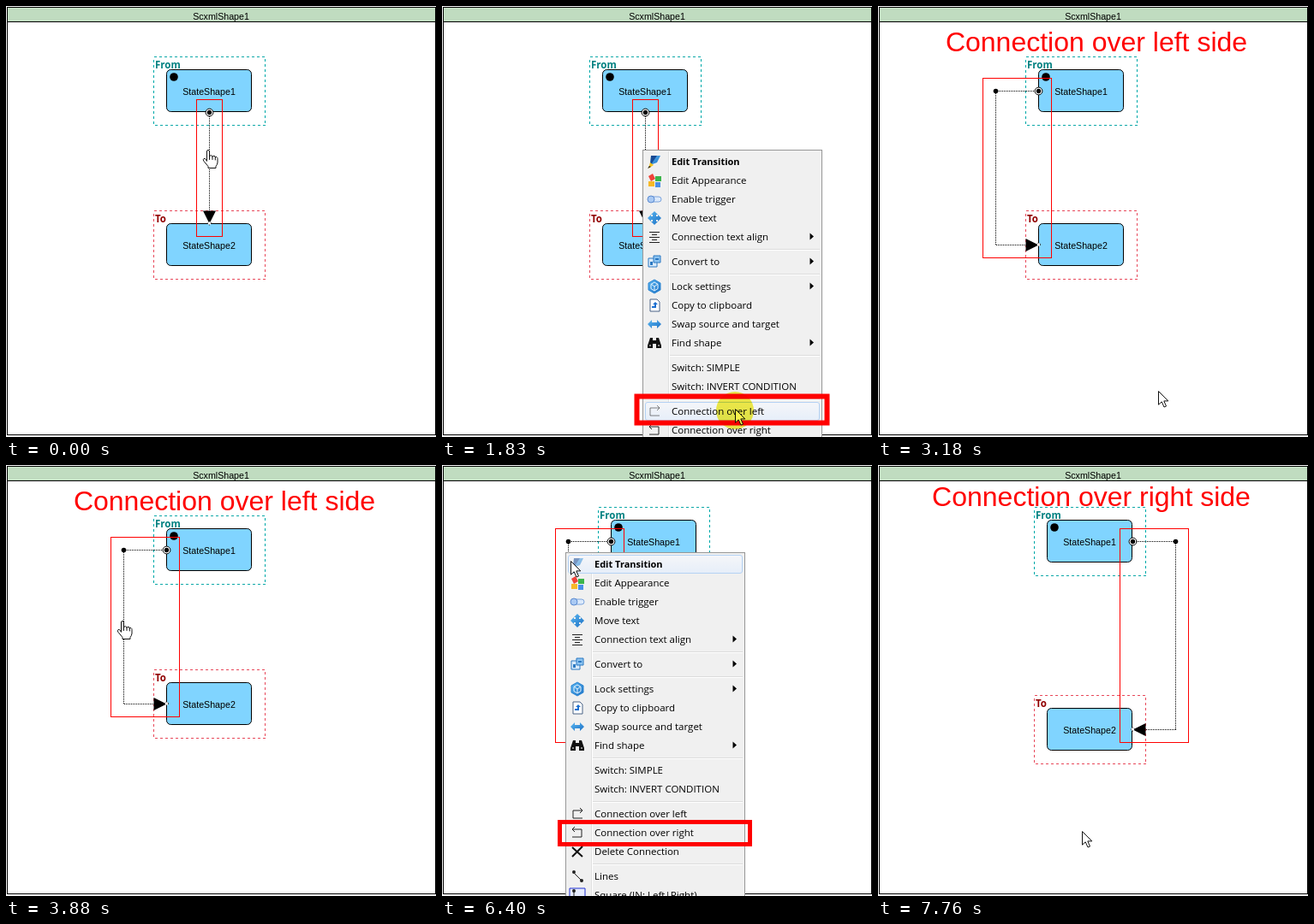
Write an HTML page that moves like this. It is 502 px wide and 504 px high and loops after 8 s.

```html
<!DOCTYPE html>
<html lang="en">
<head>
<meta charset="utf-8">
<title>Connection sides</title>
<style>
html, body { margin: 0; width: 100%; height: 100%; overflow: hidden; background: #fff; }
svg { display: block; width: 502px; height: 504px; }
text { font: 11.5px "Open Sans", "Noto Sans", sans-serif; fill: #000; }
.label { font: 10.67px "Liberation Sans", Arial, sans-serif; text-anchor: middle; }
.tag { font-weight: 700; }
.bold { font-weight: 700; font-size: 11px; }
.title { font: 32px "Liberation Sans", Arial, sans-serif; fill: #f00; text-anchor: middle; }
.crisp { shape-rendering: crispEdges; }
.glow { visibility: hidden; }
.hot > .glow { visibility: visible; }
.hot > .icon { opacity: .55; }
.hot > .more { opacity: .08; }
.solo > :not(.hot) { display: none; }
#click { mix-blend-mode: multiply; }
</style>
</head>
<body>
<svg id="stage" viewBox="0 0 502 504">
  <defs>
    <linearGradient id="hover" x2="0" y2="1">
      <stop offset="0" stop-color="#f5f6f9"/><stop offset="1" stop-color="#e6eef9"/>
    </linearGradient>
    <linearGradient id="blue" x2="1" y2="1">
      <stop offset="0" stop-color="#5cb8f2"/><stop offset="1" stop-color="#1a6fc4"/>
    </linearGradient>
  </defs>
  <g class="crisp" stroke="#000">
    <rect x="1.5" y="1.5" width="500" height="500" fill="#fff"/>
    <rect x="1.5" y="1.5" width="500" height="17" fill="#c0dcc0"/>
  </g>
  <text class="label" x="251" y="16">ScxmlShape1</text>
  <g id="scenes"></g>
  <text class="title" id="leftTitle" x="255" y="53">Connection over left side</text>
  <text class="title" id="rightTitle" x="249" y="48">Connection over right side</text>
  <g id="menus"></g>
  <g fill="none" stroke="#f00">
    <rect id="leftBox" x="227.5" y="456.5" width="222" height="31" stroke-width="6"/>
    <rect id="rightBox" x="137.5" y="417.5" width="222" height="26" stroke-width="5"/>
  </g>
  <path id="arrow" d="M.5 .5V16.2L4.2 12.8 7 19 9.5 18 6.8 11.9H11.8Z" fill="#fff" stroke="#111" stroke-linejoin="round"/>
  <g id="hand" stroke="#111" stroke-linejoin="round" stroke-linecap="round">
    <path fill="#fff" d="M-1.5 13V2Q-1.5 .5 0 .5T1.5 2V8Q2 6.5 3.5 6.7T5 8.5Q5.5 7 7 7.3T8.3 9.2Q9 8 10 8.6T11 10.5V15Q10.5 18 9 19.5V21.5H0V19.5L-5 13.5Q-6.5 11.5-5 10.5T-2.5 11.8Z"/>
    <path fill="none" d="M1.5 8V11.5M5 8.5V11.5M8.3 9.2V12"/>
  </g>
  <circle id="click" r="22" fill="#f6f04a"/>
</svg>
<script>
const $ = id => document.getElementById(id);

function add(parent, tag, attrs = {}, text) {
  const el = document.createElementNS("http://www.w3.org/2000/svg", tag);
  for (const k in attrs) el.setAttribute(k, attrs[k]);
  if (text) el.textContent = text;
  return parent.appendChild(el);
}
const show = (el, on) => el.style.display = on ? "" : "none";
const place = (el, x, y) => el.setAttribute("transform", `translate(${x} ${y})`);

// ---- diagrams ----
function state(g, x, y, name, tag, dash, ink) {
  add(g, "rect", { x: x - 14.5, y: y - 14.5, width: 130, height: 80, fill: "none", stroke: dash, "stroke-dasharray": "3 3", class: "crisp" });
  add(g, "rect", { x: x + .5, y: y + .5, width: 99, height: 49, rx: 5, fill: "#80d4ff", stroke: "#000" });
  add(g, "text", { x: x + 50, y: y + 30, class: "label" }, name);
  add(g, "text", { x: x - 13, y: y - 1, class: "tag", style: `fill:${ink}` }, tag);
}

function scene(x, y, y2, side) {
  const g = add($("scenes"), "g");
  state(g, x, y, "StateShape1", "From", "#00a8a8", "#008080");
  state(g, x, y2, "StateShape2", "To", "#e8485a", "#900000");
  add(g, "circle", { cx: x + 9, cy: y + 9, r: 4.8 });

  const sx = x + 50 + side * 50, via = sx + side * 50;
  const top = side ? y + 25 : y + 50, end = side ? y2 + 25 : y2;
  const line = `M${sx + .5} ${top + .5}H${via + .5}V${end + .5}H${sx + .5}`;
  add(g, "path", { d: line, fill: "none", stroke: "#000", "stroke-dasharray": "1 1", class: "crisp" });
  if (side) add(g, "circle", { cx: via + .5, cy: top + .5, r: 2.8 });
  const turn = side * 90;
  add(g, "path", { d: "M-7.5-15H7.5L0 0Z", transform: `translate(${sx + .5} ${end + .5}) rotate(${turn})` });
  add(g, "circle", { cx: sx + .5, cy: end, r: 2, fill: "#fff", stroke: "#000", "stroke-dasharray": "1 1.5" });
  add(g, "circle", { cx: sx + .5, cy: top + .5, r: 4.4, fill: "#fff", stroke: "#000" });
  add(g, "circle", { cx: sx + .5, cy: top + .5, r: 2.7 });
  add(g, "rect", {
    x: Math.min(sx, via) - 14.5, y: top - 14.5, width: Math.abs(via - sx) + 30, height: end - top + 30,
    fill: "none", stroke: "#f00", class: "crisp"
  });
  return g;
}

// ---- context menu; icons are [path, fill, stroke] around their centre ----
const bracket = "M6 5H-5V-4H6M3-7 6-4 3-1";
const icons = {
  pen: [["M-4-7H7L3 1-5 4Z", "url(#blue)"], ["M-4-7H3L-3 2-5 4Z", "#174a94"], ["M-5 1-1 4-7 8Z", "#f2c21c"], ["M-6 5-4 6-8 8Z", "#222"]],
  tiles: [["M-7-5-2-8 1-2-4 1Z", "#f0433a"], ["M1-5H8V1H1Z", "#3cb54a"], ["M-7 1H0V7H-7Z", "#f7b928"], ["M1 2H7V8H1Z", "#4a8fe8"]],
  toggle: [["M-4-3H5A3 3 0 0 1 5 3H-4Z", "#dbe9fb", "#7ba3dc"], ["M-8 0A4 4 0 1 1 0 0 4 4 0 1 1-8 0Z", "#a9c9f3", "#5b8ad0"]],
  move: [["M0-8 4-4H2V-2H4V-4L8 0 4 4V2H2V4H4L0 8-4 4H-2V2H-4V4L-8 0-4-4V-2H-2V-4H-4Z", "url(#blue)"]],
  align: [["M-6-5.5H6M-3-2.5H3M-6 .5H6M-3 3.5H3M-6 6.5H6", "none", "#222"]],
  convert: [["M-7-4H3V6H-7Z", "#d9ebfb", "#2b78c2"], ["M-1-7H7V1H-1Z", "#8cc3f0", "#2b78c2"], ["M-5 0H-2V4H-5ZM1-4H5V-2H1Z", "#2b78c2"]],
  lock: [["M0-8 7-4V4L0 8-7 4V-4Z", "url(#blue)", "#2d86d3"], ["M0 0V5M0 0-4-3M0 0 4-3M-4-2.5 0-5 4-2.5V2.5L0 5-4 2.5Z", "none", "#e8f5ff"]],
  copy: [["M-5-7H3L6-4V7H-5Z", "#fff", "#4a6285"], ["M-3 3H2V-1H4L1-4-2-1H0V1H-3Z", "#1c6fd0"]],
  swap: [["M-8 0-3-5V-2H3V-5L8 0 3 5V2H-3V5Z", "url(#blue)"]],
  find: [["M-5-6H-2V-3H2V-6H5L8 3V6H2V1H-2V6H-8V3Z", "#111"], ["M-6 3H-4M4 3H6", "none", "#fff"]],
  left: [[bracket, "none", "#222"]],
  right: [["M-6 5H5V-4H-6M-3-7-6-4-3-1", "none", "#222"]],
  del: [["M-6-5 6 6M6-6-6 6", "none", "#111", 2]],
  lines: [["M-4-4 5 5", "none", "#222"], ["M-6-5A2 2 0 1 1-2-5 2 2 0 1 1-6-5ZM3 5A2 2 0 1 1 7 5 2 2 0 1 1 3 5Z", "#222"]],
  square: [["M-9-8H9V9H-9Z", "#e6ecff", "#2030d0"], ["M-4-5V4H5M3 2 5 4 3 6", "none", "#222"], ["M-6-5A2 2 0 1 1-2-5 2 2 0 1 1-6-5Z", "#222"]]
};
// "-" is a separator, a trailing ">" opens a submenu
const entries = [
  "pen|Edit Transition", "tiles|Edit Appearance", "toggle|Enable trigger", "move|Move text", "align|Connection text align|>",
  "-", "convert|Convert to|>",
  "-", "lock|Lock settings|>", "copy|Copy to clipboard", "swap|Swap source and target", "find|Find shape|>",
  "-", "|Switch: SIMPLE", "|Switch: INVERT CONDITION",
  "-", "left|Connection over left", "right|Connection over right", "del|Delete Connection",
  "-", "lines|Lines", "square|Square (IN: Left|Right)"
];

function menu(x, y) {
  const g = add($("menus"), "g");
  place(g, x, y);
  add(g, "rect", { x: .5, y: .5, width: 209, height: 480, fill: "#f0f0f0", stroke: "#979797", class: "crisp" });
  add(g, "path", { d: "M30.5 2V480", stroke: "#dfe0e0", class: "crisp" });
  add(g, "path", { d: "M31.5 2V480", stroke: "#fff", class: "crisp" });
  const items = [];
  let mid = 14;
  entries.forEach((entry, i) => {
    if (entry === "-") {
      add(g, "path", { d: `M32 ${mid - 7.5}H207`, stroke: "#dcdcdc", class: "crisp" });
      add(g, "path", { d: `M32 ${mid - 6.5}H207`, stroke: "#fff", class: "crisp" });
      mid += 7;
      return;
    }
    const [icon, ...rest] = entry.split("|");
    const sub = rest[rest.length - 1] === ">";
    if (sub) rest.pop();
    const el = add(g, "g");
    place(el, 0, mid);
    add(el, "rect", { x: 3.5, y: -10.5, width: 203, height: 21, rx: 2.5, fill: "url(#hover)", stroke: "#b4d2f4", class: "glow" });
    const pic = add(el, "g", { class: "icon", transform: "translate(14 0)" });
    for (const [d, fill, stroke = "none", w = 1] of icons[icon] || []) add(pic, "path", { d, fill, stroke, "stroke-width": w });
    add(el, "text", { x: 34, y: 4, class: i ? "" : "bold" }, rest.join("|"));
    if (sub) add(el, "path", { d: "M195.5-4.5V3.5L200-.5Z", class: "more" });
    items.push({ el, mid });
    mid += 22;
  });
  return { g, x, y, items };
}

function drawMenu(m, on, cursor, opacity = 1, solo = false) {
  show(m.g, on);
  if (!on) return;
  m.g.style.opacity = opacity;
  m.g.classList.toggle("solo", solo);
  for (const { el, mid } of m.items) el.classList.toggle("hot", Math.abs(cursor[1] - m.y - mid) < 11);
}

const scenes = [scene(187, 74, 254, 0), scene(187, 74, 254, -1), scene(197, 64, 284, -1), scene(197, 64, 284, 1)];
const menuA = menu(234, 168), menuB = menu(144, 102);

// ---- motion ----
const STEP = 70;

// Eased travel in whole steps; px and py bend the path
function travel(t, start, steps, from, to, px = 1, py = 1) {
  const n = Math.floor((t - start) / STEP + 1e-6) + 1;
  const k = Math.max(0, Math.min(1, n / steps));
  const s = k * k * (3 - 2 * k);
  return [from[0] + (to[0] - from[0]) * s ** px, from[1] + (to[1] - from[1]) * s ** py].map(Math.round);
}

function cursorAt(t) {
  if (t < 70) return [236, 168];
  if (t < 3110) return travel(t, 930, 10, [234, 168], [342, 471], .565, .957);
  if (t < 4950) return travel(t, 3110, 12, [342, 471], [136, 182]);
  return travel(t, 6400, 11, [144, 102], [238, 428], .73, .927);
}

// Opacity of the chosen entry as it fades out in steps
const fade = (t, start, end) => 1 - (Math.floor((t - start) / STEP + 1e-6) * STEP) / (end - start);

function draw(t) {
  const at = cursorAt(t), hand = t < 70 || (t >= 3880 && t < 4950);
  const now = t < 2090 ? 0 : t < 4950 ? 1 : t < 7550 ? 2 : 3;
  scenes.forEach((s, i) => show(s, i === now));
  show($("leftTitle"), now === 1);
  show($("rightTitle"), now === 3);
  show($("leftBox"), t >= 140 && now === 0);
  show($("rightBox"), now === 2);

  if (t < 2090) drawMenu(menuA, t >= 70, at, t < 140 ? .5 : 1);
  else drawMenu(menuA, t < 2580, at, t < 2160 ? 1 : fade(t, 2160, 2580), true);
  if (t < 7550) drawMenu(menuB, t >= 4950, at);
  else drawMenu(menuB, t < 7760, at, fade(t, 7550, 7760), true);

  const click = (t >= 1760 && t < 2020) || (t >= 7220 && t < 7480);
  show($("click"), click);
  place($("click"), at[0], at[1] + 2);
  show($("hand"), hand);
  show($("arrow"), !hand);
  place($(hand ? "hand" : "arrow"), ...at);
}

const began = performance.now();
function tick() {
  draw((performance.now() - began) % 8000);
  requestAnimationFrame(tick);
}
tick();
</script>
</body>
</html>
```
